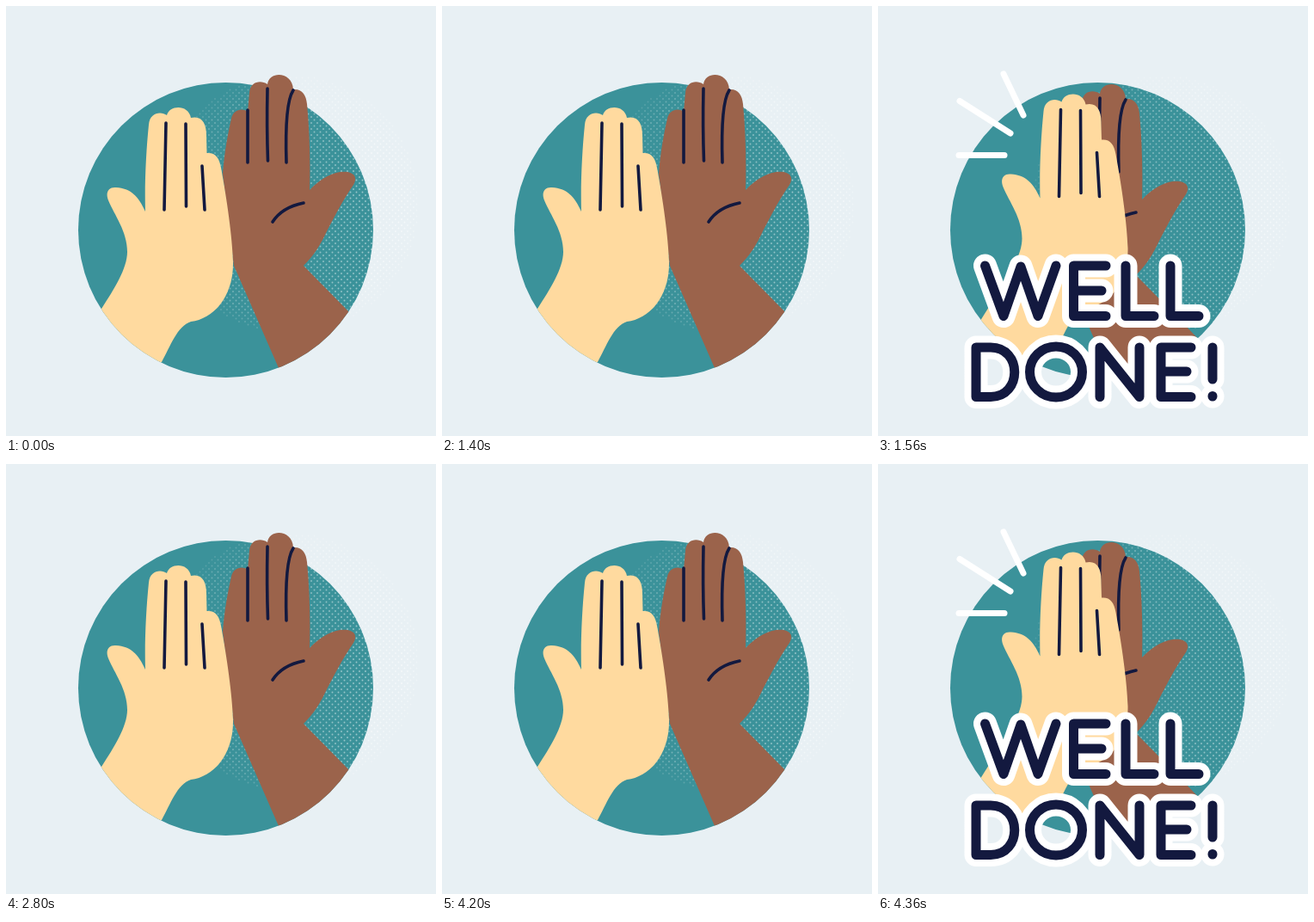
Write an HTML page with a canvas that moves like this. It is 500 px wide and 500 px high and loops after 5520 ms.

```html
<!DOCTYPE html>
<html lang="en">
<head>
<meta charset="utf-8">
<title>Well done!</title>
<style>
html, body { margin: 0; width: 100%; height: 100%; overflow: hidden; background: #e8f0f4; }
canvas { display: block; width: 500px; height: 500px; }
</style>
</head>
<body>
<canvas id="stage" width="500" height="500" role="img" aria-label="WELL DONE!">WELL DONE!</canvas>
<script>
const ctx = document.getElementById('stage').getContext('2d');
const LOOP = 5520, BEAT = 1400, STEP = 40, STEPS = 4;
const NAVY = '#13193f', SKIN = '#ffda9f', BROWN = '#9b634b', TEAL = '#3b929a';
const DISC = { x: 255.5, y: 260.5, r: 171.5 };

const left = {
  color: SKIN, dx: 26.5, dy: -15.5,
  shape: new Path2D(`M70 417 L111 352 C126 329 141 305 141 286 C141 262 126 243 119 226
    C115 216 120 210 128 211 C145 212 154 221 162 239 C161 205 163 168 166 138
    C167 124 180 122 187 127 C190 115 212 114 215 130 C228 127 233 137 233 150
    L233.5 171 C243 170 248 176 250 188 C257 226 263 268 264 297
    C265 338 241 364 215 367 C199 372 191 396 181 414 L158 428 L150 475 Z`),
  lines: new Path2D('M186 136 L184 237 M209 137 L209.5 233 M228 186 L231 237')
};
const right = {
  color: BROWN, dx: -46, dy: 11,
  shape: new Path2D(`M345 484 L317 421 L265 302 L252 195 C254 170 258 148 262 131
    C264 121 274 118 281 123 L283 101 C284 87 297 86 304 91 C306 75 333 76 334 97
    C344 96 349 103 350 114 C353 145 354 180 353 214 C368 198 385 191 397 193
    C407 195 408 201 404 208 C391 227 382 245 374 260 C365 279 358 290 346 302
    L400 357 L470 430 Z`),
  lines: new Path2D(`M281 121 L281 182 M304 96 Q303 140 304.5 180
    M334 98 C326 110 325 150 326 182 M310 251 Q321 234 346 229`)
};

const words = new Path2D(`M124.5 302 L146 360.5 L166 303 L186 360.5 L207 302
  M265 302 H227.5 V360.5 H265 M227.5 331 H260 M288 302 V360.5 H321 M340 302 V360.5 H373
  M114 397 V454.5 H131 C168 454.5 168 397 131 397 Z
  M237.5 425.5 A30.5 29.5 0 1 1 176.5 425.5 A30.5 29.5 0 1 1 237.5 425.5
  M258 454.5 V397 L304 454.5 V397 M364 397 H329 V454.5 H364 M329 425 H359
  M389 397 V434 M389 453.5 V454`);
const rays = [[169, 127, 146, 79], [154, 148, 95, 110.5], [147, 173.5, 94, 173.5]];

// Hands may rise above the disc but are cut by its lower rim.
const mask = new Path2D();
mask.rect(0, 0, 500, 290);
mask.arc(DISC.x, DISC.y, DISC.r, 0, Math.PI * 2);

function stroke(path, color, width) {
  ctx.strokeStyle = color;
  ctx.lineWidth = width;
  ctx.stroke(path);
}

function drawBackdrop() {
  ctx.fillStyle = '#e8f0f4';
  ctx.fillRect(0, 0, 500, 500);
  ctx.fillStyle = TEAL;
  ctx.beginPath();
  ctx.arc(DISC.x, DISC.y, DISC.r, 0, Math.PI * 2);
  ctx.fill();

  // Staggered dots, stronger towards the right.
  ctx.fillStyle = '#fff';
  for (let y = 80, row = 0; y < 382; y += 3.5, row++) {
    for (let x = 180 + (row % 2) * 3.5; x < 482; x += 7) {
      const edge = 150 - Math.hypot(x - 330, y - 230);
      if (edge <= 0) continue;
      ctx.globalAlpha = (0.2 + (x - 180) / 800) * Math.min(1, 0.5 + edge / 35);
      ctx.beginPath();
      ctx.arc(x, y, 0.95, 0, Math.PI * 2);
      ctx.fill();
    }
  }
  ctx.globalAlpha = 1;
}

function drawHand(hand, p) {
  ctx.save();
  ctx.clip(mask);
  ctx.translate(hand.dx * p, hand.dy * p);
  ctx.fillStyle = hand.color;
  ctx.fill(hand.shape);
  stroke(hand.lines, NAVY, 3.6);
  ctx.restore();
}

function drawCheer(q) {
  if (q <= 0) return;
  for (const [x0, y0, x1, y1] of rays) {
    const ray = new Path2D();
    ray.moveTo(x0, y0);
    ray.lineTo(x0 + (x1 - x0) * q, y0 + (y1 - y0) * q);
    stroke(ray, '#fff', 7);
  }
  ctx.save();
  const scale = 0.5 + 0.5 * q;
  ctx.translate(250, 380);
  ctx.scale(scale, scale);
  ctx.translate(-250, -380);
  stroke(words, '#fff', 27);
  stroke(words, NAVY, 11);
  ctx.restore();
}

function draw(now) {
  const t = (now % LOOP) % BEAT;
  const p = Math.min(STEPS, Math.floor(t / STEP)) / STEPS;
  drawBackdrop();
  drawHand(right, p);
  drawHand(left, p);
  drawCheer(p * 2 - 1);
}

ctx.lineCap = ctx.lineJoin = 'round';
const start = performance.now();
function tick() {
  draw(performance.now() - start);
  requestAnimationFrame(tick);
}
tick();
</script>
</body>
</html>
```
